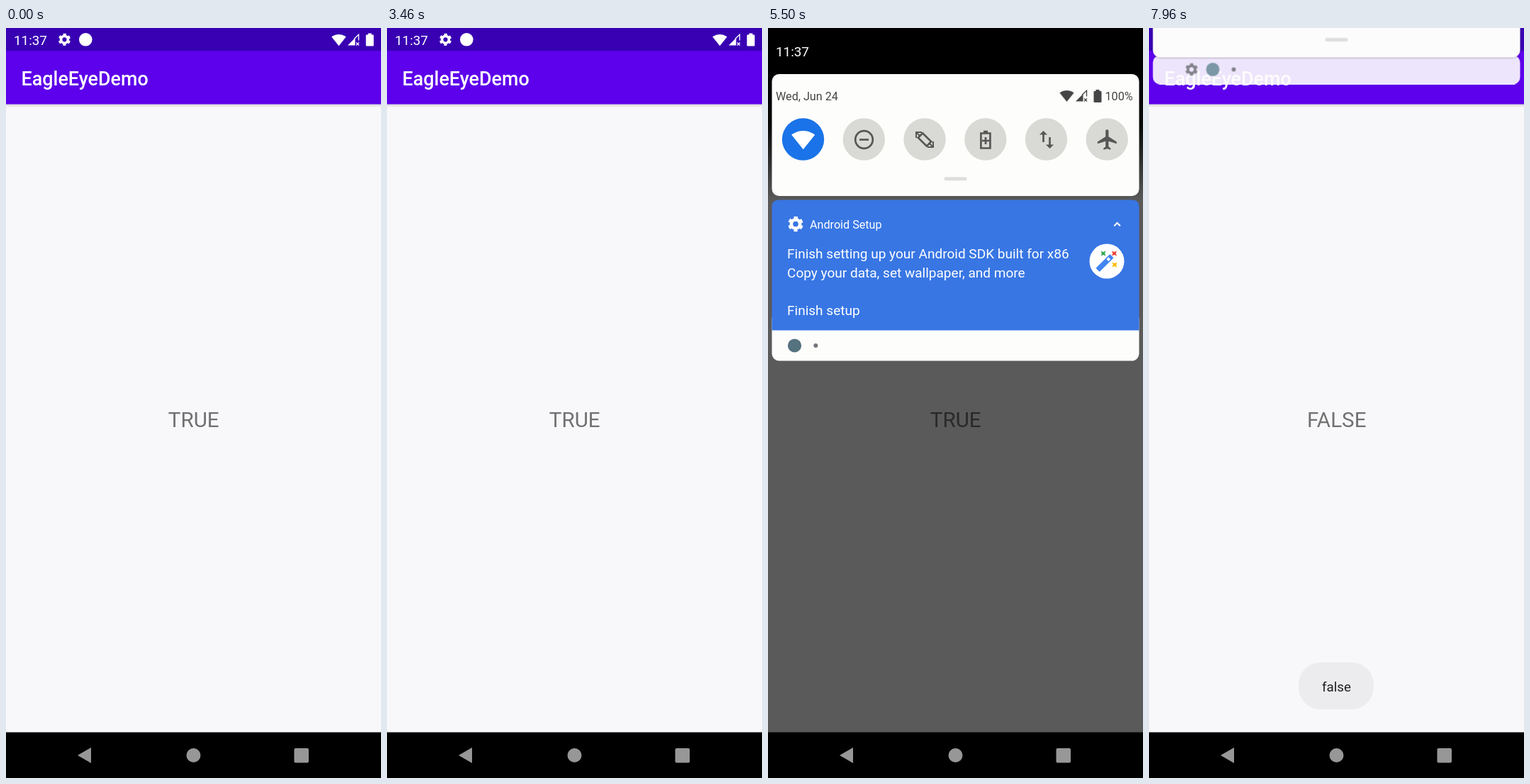
Write an HTML page that moves like this. It is 529 px wide and 1058 px high and loops after 8 s.

```html
<!DOCTYPE html>
<html lang="en">
<head>
<meta charset="utf-8">
<title>Notification shade</title>
<style>
  html, body { margin: 0; width: 100%; height: 100%; overflow: hidden; background: #000; }
  svg { display: block; width: 100vw; height: 100vh; }
  text { font: 16.16px Roboto, sans-serif; }
  .body { font-size: 19.05px; }
  .label { font-size: 18.86px; }
  .title { font-size: 26.9px; font-weight: 500; }
  .value { font-size: 29.6px; text-anchor: middle; fill: #717171; }
  .line { fill: none; stroke: currentColor; stroke-width: 2.7; }

  [class^="a-"] { animation: 8s linear infinite; }
  .a-true { animation-name: hide-true; animation-timing-function: step-end; }
  .a-false { animation-name: show-false; animation-timing-function: step-end; }
  .a-scrim { animation-name: scrim; }
  .a-open { animation-name: open; animation-timing-function: step-end; }
  .a-part { animation-name: part; animation-timing-function: step-end; }
  .a-full { animation-name: full; animation-timing-function: step-end; }
  .a-manage { animation-name: manage; }
  .a-peek { animation-name: peek; }
  .a-shelf { animation-name: shelf; }
  .a-signal { animation-name: signal; animation-timing-function: step-end; }
  .a-tile { animation-name: tile; }
  .a-wifi { animation-name: wifi; }
  .a-ripple { animation-name: ripple; transform-origin: 49.5px 157px; }
  .a-toast { animation-name: toast; }

  @keyframes hide-true { 0% { opacity: 1 } 85.5%, 100% { opacity: 0 } }
  @keyframes show-false { 0% { opacity: 0 } 85.5%, 100% { opacity: 1 } }
  @keyframes scrim {
    0%, 67.73% { opacity: 0 } 67.74%, 68.72% { opacity: .15 }
    68.73%, 69.85% { opacity: .635 } 69.87%, 99.47% { opacity: .705 }
    99.48%, 100% { opacity: 0 }
  }
  @keyframes open { 0% { opacity: 0 } 68.73% { opacity: 1 } 99.48%, 100% { opacity: 0 } }
  @keyframes part { 0% { opacity: 1 } 69.86%, 100% { opacity: 0 } }
  @keyframes full { 0% { opacity: 0 } 69.86%, 100% { opacity: 1 } }
  @keyframes manage { 0%, 69.86% { opacity: 0 } 71.35%, 100% { opacity: 1 } }
  @keyframes peek {
    0%, 47.9% { transform: translateY(-50px) }
    49.4%, 50.6% { transform: none }
    51.9%, 67.73% { transform: translateY(-50px) }
    67.74%, 68.72% { transform: translateY(15px) }
    68.73%, 99.47% { transform: translateY(-50px) }
    99.48%, 100% { transform: translateY(34.5px) }
  }
  @keyframes shelf {
    0%, 67.73% { transform: none }
    67.74%, 68.72% { transform: translateX(-8px) }
    68.73%, 99.47% { transform: none }
    99.48%, 100% { transform: translateX(-18.5px) }
  }
  @keyframes signal { 0% { opacity: 1 } 85.4%, 100% { opacity: 0 } }
  @keyframes tile {
    0%, 84.6% { fill: #1a73e8 } 85.9%, 86.4% { fill: #5088c9 } 88%, 100% { fill: #d9d9d5 }
  }
  @keyframes wifi {
    0%, 84.6% { fill: #fff } 85.9%, 86.4% { fill: #9c9f9f } 88%, 100% { fill: #575757 }
  }
  @keyframes ripple {
    0%, 83.8% { transform: scale(.5); opacity: 0 }
    84% { transform: scale(.6); opacity: 1 }
    85.9%, 87% { transform: none; opacity: 1 }
    89%, 100% { transform: none; opacity: 0 }
  }
  @keyframes toast { 0%, 86.7% { opacity: 0 } 88.6%, 100% { opacity: 1 } }
</style>
</head>
<body>
<svg viewBox="0 0 529 1058" preserveAspectRatio="none">
  <defs>
    <g id="gear" fill="none" stroke="currentColor">
      <circle r="5.6" stroke-width="4.2"/>
      <circle r="8.3" stroke-width="3" stroke-dasharray="4.7 3.99" stroke-dashoffset="6.7"/>
    </g>
    <path id="fan" d="M0 9.5 11.6-5C11.2-5.3 6.7-9 0-9S-11.2-5.3-11.6-5Z"/>
    <g id="cell">
      <path d="M0 16 10.5 5.5V16Z" fill="currentColor"/>
      <path d="M9 7 15.5.8V9M12 12l4 4m0-4-4 4" fill="none" stroke="currentColor" stroke-width="1.3"/>
    </g>
    <path id="battery" d="M1 2H3V0H8V2H10Q11 2 11 3V17Q11 18 10 18H1Q0 18 0 17V3Q0 2 1 2Z" fill="currentColor"/>
    <path id="star" d="M0-5 1.5-1.5 5 0 1.5 1.5 0 5-1.5 1.5-5 0-1.5-1.5Z" transform="rotate(45)"/>
    <linearGradient id="drop" x2="0" y2="1">
      <stop stop-color="#000" stop-opacity=".16"/><stop offset="1" stop-color="#000" stop-opacity="0"/>
    </linearGradient>
    <linearGradient id="shade" x2="0" y2="1">
      <stop stop-color="#000"/><stop offset=".4" stop-color="#000" stop-opacity=".9"/>
      <stop offset="1" stop-color="#000" stop-opacity="0"/>
    </linearGradient>
    <filter id="lift" x="-5%" y="-10%" width="110%" height="130%">
      <feDropShadow dx="0" dy="1" stdDeviation="1.2" flood-opacity=".25"/>
    </filter>
  </defs>

  <!-- App -->
  <rect width="529" height="994" fill="#f8f8fb"/>
  <rect y="107" width="529" height="5" fill="url(#drop)"/>
  <rect y="32" width="529" height="75.5" fill="#5d00eb"/>
  <rect width="529" height="32.3" fill="#3800b2"/>
  <g fill="#fff" color="#fff">
    <text class="label" x="11" y="23.5">11:37</text>
    <use href="#gear" transform="translate(82.5 16.3) scale(.88)"/>
    <circle cx="112.3" cy="16.3" r="9.3"/>
    <use href="#fan" transform="translate(469.5 16.8) scale(.88)"/>
    <use href="#cell" x="482" y="8.5"/>
    <use href="#battery" x="507.7" y="7.5"/>
    <text class="title" x="21.5" y="81">EagleEyeDemo</text>
  </g>
  <g class="a-true"><text class="value" x="264.7" y="562.5">TRUE</text></g>
  <g class="a-false"><text class="value" x="264.7" y="562.5">FALSE</text></g>

  <rect class="a-scrim" width="529" height="994"/>

  <!-- Shade at its edge -->
  <g class="a-peek">
    <rect x="5.5" y="4" width="518" height="41" rx="10" fill="#fcfcfc" fill-opacity=".91"/>
    <g class="a-shelf" fill="#83838b" color="#83838b">
      <use href="#gear" transform="translate(78.5 24) scale(.9)"/>
      <circle cx="108.5" cy="24" r="9.4" fill="#7c97a6"/>
      <circle cx="138" cy="24" r="3"/>
    </g>
    <rect x="5.5" y="-90" width="518" height="97" rx="10" fill="#fcfcfc" filter="url(#lift)"/>
    <rect x="248.5" y="-20.5" width="32" height="5" rx="2.5" fill="#dedede"/>
  </g>

  <!-- Open shade -->
  <g class="a-open">
    <rect width="529" height="65"/>
    <rect y="65" width="529" height="178" fill="url(#shade)"/>
    <text class="label" x="11" y="39.5" fill="#fff">11:37</text>

    <rect x="5.5" y="65" width="518" height="172" rx="10" fill="#fdfdfc"/>
    <g fill="#454545" color="#454545">
      <text x="11" y="102">Wed, Jun 24</text>
      <g class="a-signal"><use href="#fan" transform="translate(421.5 95.8) scale(.86)"/></g>
      <use href="#cell" x="434" y="87.5"/>
      <use href="#battery" x="459.5" y="87"/>
      <text x="475.5" y="102">100%</text>
    </g>
    <circle class="a-ripple" cx="49.5" cy="157" r="39" fill="#e9e9e8"/>
    <circle class="a-tile" cx="49.5" cy="157" r="29.7"/>
    <g class="a-wifi"><use href="#fan" transform="translate(49.7 157.8) scale(1.42)"/></g>
    <g fill="#d9d9d5">
      <circle cx="135.3" cy="157" r="29.7"/><circle cx="221" cy="157" r="29.7"/>
      <circle cx="306.8" cy="157" r="29.7"/><circle cx="392.5" cy="157" r="29.7"/>
      <circle cx="478.2" cy="157" r="29.7"/>
    </g>
    <g color="#575757" fill="#575757">
      <g class="line">
        <path d="M129 157.5h13"/><circle cx="135.5" cy="157.5" r="12.3"/>
        <g transform="translate(221 157.5)">
          <rect x="-4.5" y="-8.5" width="9" height="17" transform="rotate(-45)"/>
          <path d="M-12-2.5V-10.5H-4M-11.5-10-6-4.5M12 2.5V10.5H4M11.5 10 6 4.5" stroke-width="2"/>
        </g>
        <path d="M300.4 148.5h13v21h-13zM304 146h6M307 154v10M302 159h10"/>
        <path d="M388.5 161V147M397.5 154V168"/>
      </g>
      <path d="M383 150.5 388.5 145 394 150.5ZM392 164.5 397.5 170 403 164.5Z"/>
      <path transform="translate(462 140.5) scale(1.42)" d="M21 16v-2l-8-5V3.5c0-.83-.67-1.5-1.5-1.5S10 2.67 10 3.5V9l-8 5v2l8-2.5V19l-2 1.5V22l3.5-1 3.5 1v-1.5L13 19v-5.5z"/>
    </g>
    <rect x="248.5" y="210.3" width="32" height="5" rx="2.5" fill="#dedede"/>

    <g class="a-part">
      <rect x="5.5" y="400" width="518" height="69.5" rx="10" fill="#fdfdfc"/>
      <path d="M5.5 426.5V252.5Q5.5 242.5 15.5 242.5H513.5Q523.5 242.5 523.5 252.5V426.5Z" fill="#3876e4"/>
      <circle cx="37.5" cy="448" r="9.6" fill="#55727f"/>
      <circle cx="67.3" cy="448" r="3" fill="#74747a"/>
    </g>

    <g class="a-full">
      <rect x="5.5" y="242.5" width="518" height="195.5" rx="10" fill="#3876e4"/>
      <rect x="5.5" y="443" width="518" height="275" rx="10" fill="#fdfdfc"/>
      <path d="M5.5 508.3h518M5.5 650.5h518" stroke="#dad9d2" stroke-width="1.3"/>
      <circle cx="39" cy="542.5" r="11.3" fill="#587480"/>
      <circle cx="39" cy="684.5" r="11.3" fill="#6b6b74"/>
      <g fill="#202020" color="#202020">
        <text x="27" y="482">Silent notifications</text>
        <text x="59" y="548.5">Android System</text>
        <text class="body" x="27" y="591">USB debugging connected</text>
        <text class="body" x="27" y="617.5">Tap to turn off USB debugging</text>
        <text x="59" y="690.5">Android System</text>
        <circle cx="183" cy="685.3" r="2"/>
        <text x="191.3" y="690.5">Charging this device via USB</text>
        <path class="line" stroke-width="2" d="M488.3 683l4.3 4.3 4.3-4.3"/>
      </g>
      <g class="a-manage"><text class="label" x="36" y="753" fill="#fff">Manage</text></g>
    </g>

    <g fill="#fff" color="#fff">
      <use href="#gear" transform="translate(39 276.5) scale(1.1)"/>
      <text x="59" y="282.5">Android Setup</text>
      <path class="line" style="stroke-width:2" d="M488.3 279.3l4.3-4.3 4.3 4.3"/>
      <text class="body" x="27" y="325.3">Finish setting up your Android SDK built for x86</text>
      <text class="body" x="27" y="352">Copy your data, set wallpaper, and more</text>
      <text class="body" x="27" y="404.5">Finish setup</text>
      <circle cx="478" cy="329" r="24.5"/>
    </g>
    <g transform="translate(475 331.5) rotate(45)" fill="#4285f4">
      <rect x="-3.7" y="-14" width="7.4" height="28" rx="1"/>
      <rect x="-2" y="-9.5" width="4" height="4" fill="#fff"/>
    </g>
    <use href="#star" x="473" y="318" fill="#34a853"/>
    <use href="#star" x="488.5" y="318" fill="#ea4335"/>
    <use href="#star" x="489" y="334" fill="#fbbc05"/>
  </g>

  <g class="a-toast">
    <rect x="211" y="895" width="106" height="66" rx="31" fill="#ececee"/>
    <text class="label" x="264.5" y="935.7" text-anchor="middle" fill="#202020">false</text>
  </g>

  <!-- Navigation bar -->
  <rect y="993.5" width="529" height="64.5"/>
  <g fill="#979797">
    <path d="M101 1026 120 1015V1037Z"/>
    <circle cx="264.5" cy="1026" r="10"/>
    <rect x="406.5" y="1016" width="20.5" height="20.5" rx="2"/>
  </g>
</svg>
</body>
</html>
```
